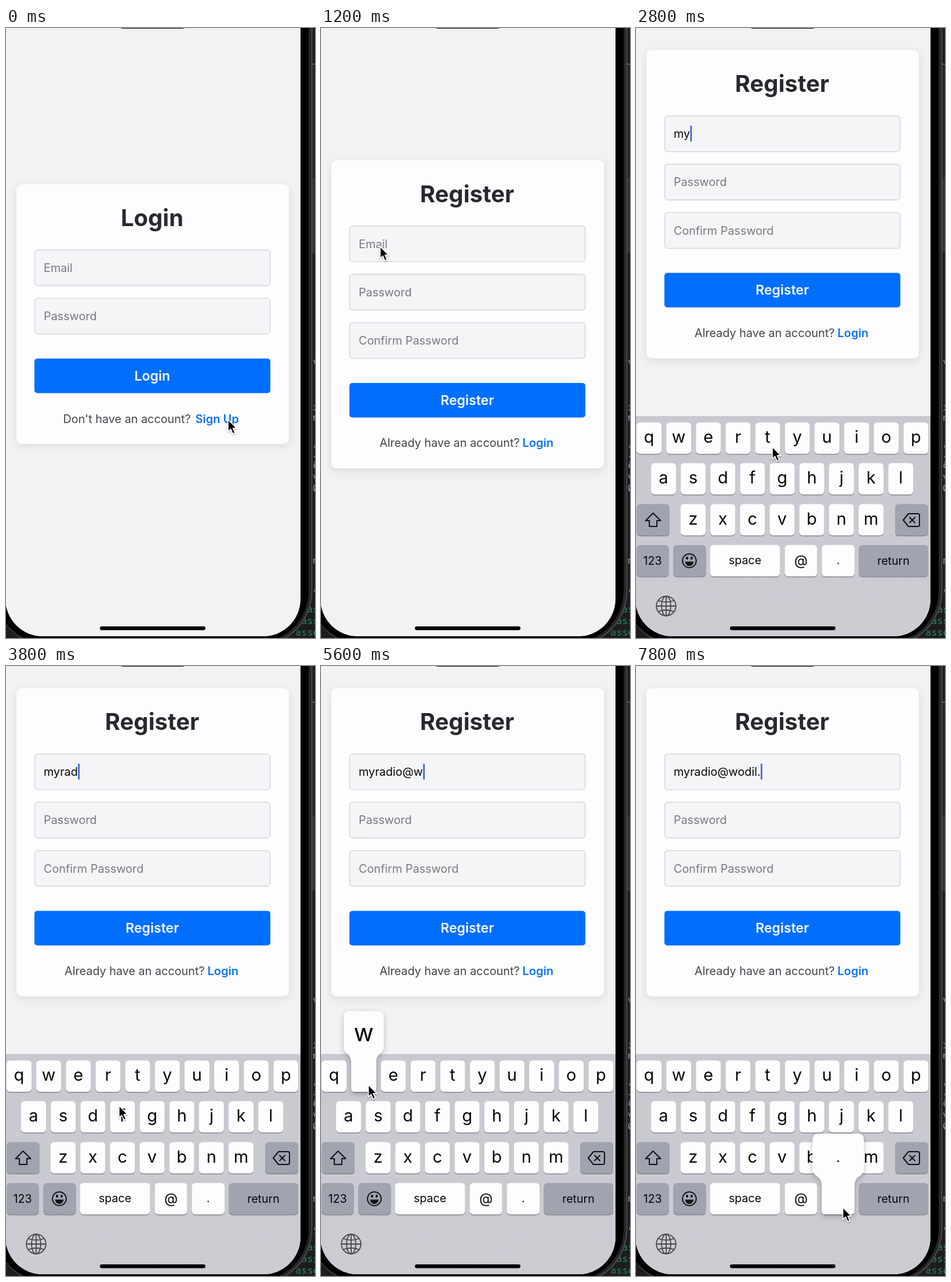
An HTML page for the animation above (8 s loop, 533 by 1050 pixels).

```html
<!DOCTYPE html>
<html lang="en">
<head>
<meta charset="utf-8">
<title>Register form</title>
<style>
  html, body { margin: 0; width: 100%; height: 100%; overflow: hidden; background: #1d1d1f; }
  svg { display: block; width: 533px; height: 1050px; font-family: Inter, "Liberation Sans", sans-serif; }
  .mid { text-anchor: middle; }
  .title { font-size: 40px; font-weight: 700; fill: #29282c; }
  .field { fill: #f5f4f7; stroke: #d4d3d7; stroke-width: 1.3; }
  .hint { font-size: 19.8px; fill: #7a797d; }
  .typed { font-size: 19.8px; fill: #08080a; }
  .action { font-size: 23px; font-weight: 600; fill: #fff; }
  .foot { font-size: 19.8px; fill: #444347; }
  .link { font-size: 20px; font-weight: 600; fill: #0a74f5; }
  .letter { font-size: 29px; fill: #060607; }
  .word { font-size: 19.6px; fill: #060607; }
  .icon { fill: none; stroke: #101013; stroke-width: 2; stroke-linejoin: round; stroke-linecap: round; }
  .code { font-family: "Noto Sans Mono", "DejaVu Sans Mono", monospace; font-size: 17px; }
</style>
</head>
<body>
<svg id="stage" viewBox="0 0 533 1050" xmlns="http://www.w3.org/2000/svg"></svg>
<script>
const LOOP = 8000, STEP = 200;
const MAIL = "myradio@wodil.";
const PRESS_TIMES = [2200, 2600, 3000, 3400, 3600, 4000, 4400, 5200, 5600, 6000, 6400, 6800, 7200, 7800];
const SUGGEST = [4600, 5200];
const stage = document.getElementById("stage");

const rect = (x, y, w, h, r, attrs) =>
  `<rect x="${x}" y="${y}" width="${w}" height="${h}" rx="${r}" ${attrs}/>`;
const text = (x, y, cls, str, extra = "") =>
  `<text x="${x}" y="${y}" class="${cls}" ${extra}>${str}</text>`;

// Keyboard layout: each character key keeps its box for presses.
const keys = {};
function addKey(char, x, y, w = 43) { keys[char] = { x, y, w, cx: x + w / 2 }; }
[["qwertyuiop", 1, 679], ["asdfghjkl", 26, 749], ["zxcvbnm", 77, 819.5]].forEach(([row, x, y]) =>
  [...row].forEach((c, i) => addKey(c, x + i * 51.15, y)));
addKey("@", 256.5, 890, 56);
addKey(".", 320.5, 890, 56.5);

const keyBox = (x, y, w, fill) =>
  rect(x, y + 1.6, w, 54, 6, 'fill="#898a90"') + rect(x, y, w, 54, 6, `fill="${fill}"`);

function keyboard() {
  const dark = "#a0a3b0", light = "#fdfdfe";
  const chars = Object.entries(keys).map(([c, k]) => keyBox(k.x, k.y, k.w, light) +
    (c === "@" ? text(k.cx, 925, "letter mid", c, 'style="font-size:24px"')
      : c === "." ? text(k.cx, 923, "word mid", c)
      : text(k.cx, k.y + 35, "letter mid", c))).join("");
  return rect(-1, 668, 510, 400, 0, 'fill="url(#board)"') + chars +
    keyBox(1, 819.5, 57, dark) + keyBox(447, 819.5, 57, dark) +
    keyBox(1, 890, 55.5, dark) + keyBox(64.5, 890, 56, dark) +
    keyBox(127.5, 890, 121, light) + keyBox(384.5, 890, 119.5, dark) +
    text(28.5, 924, "word mid", "123") + text(188, 923, "word mid", "space") +
    text(444, 924, "word mid", "return") +
    `<path class="icon" d="M29.5 835L42.5 848H36V858H23V848H16.5Z"/>
     <path class="icon" d="M470 836H486Q489 836 489 839V855Q489 858 486 858H470L461 847ZM472 842.5L481 851.5M481 842.5L472 851.5"/>
     <circle class="icon" cx="92" cy="917" r="11.8"/>
     <path d="M84.5 918.5H99.5Q98 926 92 926T84.5 918.5Z" fill="#101013"/>
     <ellipse cx="88" cy="912.5" rx="1.8" ry="2.5"/><ellipse cx="96" cy="912.5" rx="1.8" ry="2.5"/>
     <g class="icon" style="stroke:#46474c;stroke-width:1.8"><circle cx="52" cy="995" r="16.8"/>
     <ellipse cx="52" cy="995" rx="8" ry="16.8"/>
     <path d="M35.2 995H68.8M52 978V1012M38.5 985.5Q52 991 65.5 985.5M38.5 1004.5Q52 999 65.5 1004.5"/></g>`;
}

function form(id, title, fields, question, questionX, link, linkX) {
  const extra = (fields.length - 2) * 83.2;
  return `<g id="${id}">` +
    rect(18, 0, 470, 447 + extra, 9, 'fill="#fdfcff" filter="url(#cardShadow)"') +
    text(252, 72, "title mid", title) +
    fields.map((name, i) => rect(49.5, 113 + i * 83.2, 406, 61.5, 5, 'class="field"') +
      text(65, 151 + i * 83.2, "hint", name, `id="${id}-${i}"`)).join("") +
    rect(49, 300 + extra, 407, 59.5, 5, 'fill="#006eff"') +
    text(252.3, 338 + extra, "action mid", title) +
    text(questionX, 410.5 + extra, "foot", question) +
    text(linkX, 410.5 + extra, "link", link) + "</g>";
}

function desktop() {
  const bits = [["v", 580], ["r", 658], ["n", 676], ["/", 722], ["1", 748], ["c", 758], ["v", 778], ["0", 798], ["n", 922], ["/", 970]];
  return rect(0, 0, 533, 1050, 0, 'fill="#1d1d1f"') +
    rect(520, 63, 13, 195, 0, 'fill="#252527"') + rect(520, 258, 13, 129, 0, 'fill="#343436"') +
    rect(520, 61.5, 13, 1.5, 0, 'fill="#77777a"') +
    bits.map(([c, y]) => text(529, y, "code", c, 'fill="#9a9a9c"')).join("") +
    [[519, 1006], [509, 1026], [499, 1046]].map(([x, y]) => text(x, y, "code", "asset", 'fill="#278a67"')).join("");
}

stage.innerHTML = `
  <defs>
    <linearGradient id="board" x1="0" y1="0" x2="0" y2="1">
      <stop offset="0" stop-color="#c8c9d0"/><stop offset="1" stop-color="#cccdd3"/>
    </linearGradient>
    <filter id="cardShadow" x="-10%" y="-10%" width="120%" height="120%">
      <feDropShadow dx="0" dy="4" stdDeviation="7" flood-opacity=".1"/></filter>
    <filter id="softShadow" x="-30%" y="-30%" width="160%" height="170%">
      <feDropShadow dx="0" dy="3" stdDeviation="5" flood-opacity=".25"/></filter>
    <filter id="arrowShadow" x="-50%" y="-50%" width="200%" height="200%">
      <feDropShadow dx="0" dy="1.5" stdDeviation="1.2" flood-opacity=".35"/></filter>
    <clipPath id="screen">${rect(-1, -100, 509, 1147, 64, "")}</clipPath>
  </defs>
  ${desktop()}
  ${rect(-20, -100, 548.5, 1164, 95, 'fill="#4a4a4d"')}
  ${rect(-20, -100, 546.5, 1162, 93, 'fill="#252527"')}
  ${rect(-20, -100, 542, 1158, 89, 'fill="#000"')}
  <g clip-path="url(#screen)">
    ${rect(-1, -1, 510, 1050, 0, 'fill="#f2f1f4"')}
    ${form("login", "Login", ["Email", "Password"], "Don't have an account?", 98.5, "Sign Up", 326.5)}
    ${form("register", "Register", ["Email", "Password", "Confirm Password"], "Already have an account?", 101, "Login", 347.5)}
    <g id="entry">
      <rect id="mark" x="64" y="165" height="34" fill="#b5c8dc"/>
      <text id="typed" x="65" y="189" class="typed"></text>
      <rect id="caret" y="168" width="2.6" height="27.5" rx="1" fill="#3260d2"/>
    </g>
    <g id="suggest">
      ${rect(55, 197, 129, 37, 13, 'fill="#f5f4f7" filter="url(#softShadow)"')}
      ${text(65, 223, "typed", "my radio")}
      <path d="M160 211L169.5 220.5M169.5 211L160 220.5" stroke="#77777b" stroke-width="2"/>
    </g>
    <g id="board-layer">${keyboard()}</g>
    <g id="popup"><path id="bubble" fill="#fdfdfe" filter="url(#softShadow)"/><text id="bubble-char" class="mid"></text></g>
    ${rect(185, -40, 136, 41, 18, "")}
    ${rect(162, 1030, 182, 6.6, 3.3, "")}
  </g>
  <path id="pointer" filter="url(#arrowShadow)" stroke="#fff" stroke-width="1.6" stroke-linejoin="round"
    d="M0 0V20.5L4.6 16.3L8.2 24.4L12 22.7L8.5 14.9H14.8Z"/>`;

const $ = id => document.getElementById(id);
const show = (id, on) => $(id).setAttribute("display", on ? "inline" : "none");
const lerp = (a, b, p) => a + (b - a) * p;

const presses = PRESS_TIMES.map((time, i) => ({ time, char: MAIL[i], key: keys[MAIL[i]] }));
const path = [
  [0, 383, 674], [200, 383, 674], [400, 370, 650], [800, 130, 410], [1000, 102, 376],
  [1400, 102, 376], [1800, 328, 653], [3800, 195, 757], [4800, 438, 876], [6600, 195, 743],
  ...presses.map(p => [p.time, p.key.cx + 8, p.key.y + 42]), [LOOP, 357, 932]
].sort((a, b) => a[0] - b[0]);

function pointerAt(t) {
  const i = path.findIndex(p => p[0] > t);
  const [t0, x0, y0] = path[i - 1], [t1, x1, y1] = path[i];
  const p = (t - t0) / (t1 - t0);
  return [lerp(x0, x1, p), lerp(y0, y1, p)];
}

function bubblePath({ x, y, w }) {
  const m = w > 50 ? 16 : 13, l = x - m, r = x + w + m, top = y - 85, neck = y - 25;
  return `M${l + 11} ${top}H${r - 11}Q${r} ${top} ${r} ${top + 11}V${neck}` +
    `C${r} ${y - 10} ${x + w} ${y - 14} ${x + w} ${y + 4}V${y + 48}Q${x + w} ${y + 54} ${x + w - 6} ${y + 54}` +
    `H${x + 6}Q${x} ${y + 54} ${x} ${y + 48}V${y + 4}C${x} ${y - 14} ${l} ${y - 10} ${l} ${neck}` +
    `V${top + 11}Q${l} ${top} ${l + 11} ${top}Z`;
}

function render(time) {
  const t = Math.floor((time % LOOP) / STEP) * STEP;
  const registering = t >= 400;
  const lift = t < 1400 ? 0 : t < 1600 ? 0.7 : 1;
  show("login", !registering);
  show("register", registering);
  $("login").setAttribute("transform", "translate(0 269)");
  $("register").setAttribute("transform", `translate(0 ${lerp(227.8, 38.3, lift)})`);
  show("board-layer", lift > 0);
  $("board-layer").setAttribute("transform", `translate(0 ${(1 - lift) * 382})`);

  const value = MAIL.slice(0, presses.filter(p => p.time <= t).length);
  show("register-0", !value);
  show("entry", lift === 1);
  $("typed").textContent = value;
  const width = value ? $("typed").getComputedTextLength() : 0;
  $("caret").setAttribute("x", 65.5 + width);
  const suggesting = t >= SUGGEST[0] && t < SUGGEST[1];
  show("mark", suggesting);
  show("suggest", suggesting);
  $("mark").setAttribute("width", width + 4);

  const press = presses.find(p => p.time === t);
  show("popup", press);
  if (press) {
    const { key, char } = press, label = $("bubble-char");
    $("bubble").setAttribute("d", bubblePath(key));
    label.textContent = char;
    label.setAttribute("x", key.cx);
    label.setAttribute("y", key.y - (char === "." ? 36 : 33));
    label.setAttribute("font-size", char === "." ? 24 : 42);
  }
  $("pointer").setAttribute("transform", `translate(${pointerAt(t)})`);
}

const start = performance.now();
function tick() {
  render(performance.now() - start);
  requestAnimationFrame(tick);
}
tick();
</script>
</body>
</html>
```
